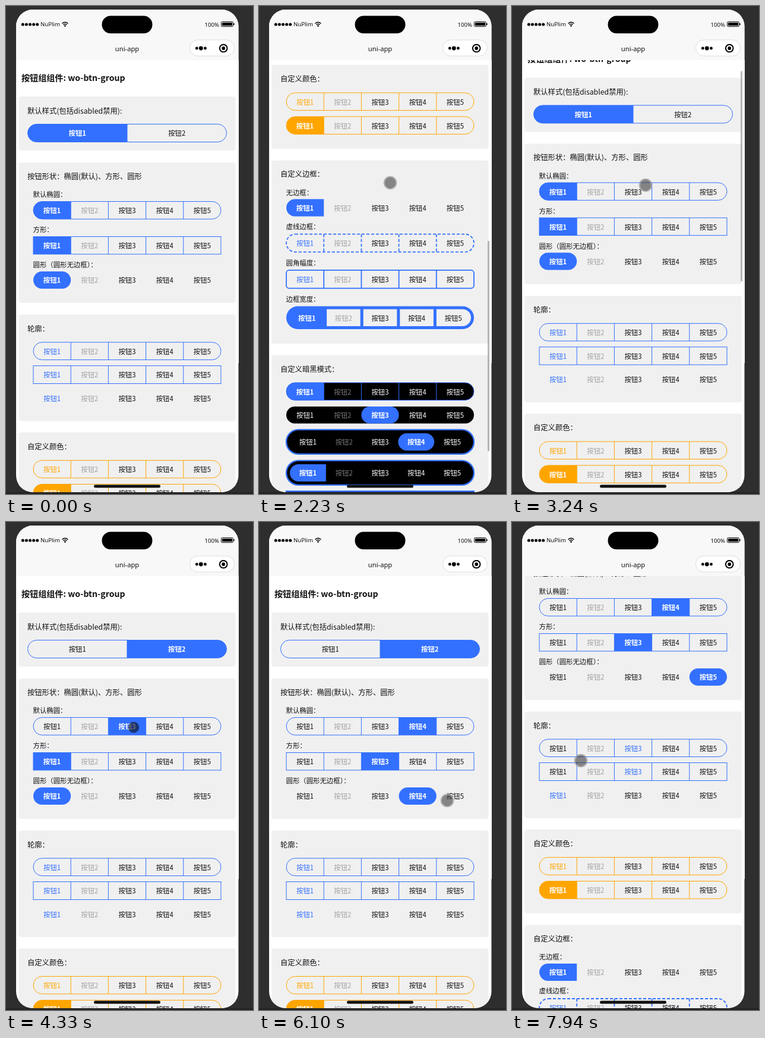
An HTML page that plays this animation: 416x820 px, repeating every 8 s.

```html
<!DOCTYPE html>
<html lang="zh-CN">
<head>
<meta charset="utf-8">
<title>wo-btn-group</title>
<style>
  html, body { margin: 0; width: 100%; height: 100%; overflow: hidden; background: #2e2e2e; }
  svg { display: block; width: 416px; height: 820px; }
  text { font-family: "Noto Sans CJK SC", "Noto Sans CJK", "Noto Sans", sans-serif; fill: #111; }
  .bar text { font-family: "Noto Sans", "Open Sans", sans-serif; }
</style>
</head>
<body>
<svg viewBox="0 0 416 820">
  <defs>
    <clipPath id="screen"><rect x="17" y="6" width="374.5" height="811" rx="28"/></clipPath>
  </defs>
  <rect width="416" height="820" fill="#2e2e2e"/>
  <rect y="817" width="416" height="3" fill="#242424"/>
  <rect x="391" y="91" width="1" height="509" fill="#fff"/>
  <g clip-path="url(#screen)">
    <rect x="17" y="6" width="375" height="811" fill="#fff"/>
    <g id="page"></g>
    <rect id="thumb" x="385" width="3" height="353" fill="#000" fill-opacity=".27"/>
    <g class="bar">
      <rect x="17" y="6" width="375" height="85" fill="#f8f8f8"/>
      <g id="dots"></g>
      <text x="58" y="34.3" font-size="9.6" textLength="">NuPlim</text>
      <g fill="none" stroke="#000" stroke-width="1.4">
        <path d="M94.5 29.5Q99.5 25 104.5 29.5M96.4 31.6Q99.5 28.8 102.6 31.6"/>
        <circle cx="99.5" cy="33.4" r=".6" fill="#000"/>
      </g>
      <rect x="161.5" y="16.5" width="85" height="29.5" rx="14.7"/>
      <text x="359" y="34.5" font-size="9.6" text-anchor="end">100%</text>
      <rect x="362.5" y="26.5" width="20" height="8" rx="1.8" fill="none" stroke="#000"/>
      <rect x="364" y="28" width="17" height="5" rx=".6"/>
      <rect x="383.3" y="29" width="1.5" height="3" rx=".7"/>
      <text x="204" y="76" font-size="11.2" text-anchor="middle">uni-app</text>
      <rect x="309.5" y="57" width="75" height="27" rx="13.5" fill="#fff" stroke="#dcdcdc"/>
      <circle cx="321.3" cy="71" r="2.4"/>
      <circle cx="328.3" cy="71" r="3.4"/>
      <circle cx="335.5" cy="71" r="2.4"/>
      <circle cx="366.2" cy="71" r="6.3" fill="none" stroke="#000" stroke-width="2"/>
      <circle cx="366.2" cy="71" r="2.9"/>
    </g>
    <rect x="148" y="804.5" width="112" height="5" rx="2.5" fill="#111"/>
  </g>
  <g id="pointer">
    <circle id="ring" r="10.2" fill="none" stroke="#999" stroke-opacity=".75" stroke-width="2.2"/>
    <circle id="disc" r="9.2"/>
  </g>
</svg>
<script>
const BLUE = '#3370ff', ORANGE = '#ffa500', LOOP = 8000;
const $ = id => document.getElementById(id);
const page = $('page');

function add(tag, attrs, parent = page) {
  const el = document.createElementNS('http://www.w3.org/2000/svg', tag);
  for (const k in attrs) el.setAttribute(k, attrs[k]);
  parent.appendChild(el);
  return el;
}

// cy is the optical centre of the line
function label(str, x, cy, size, extra = {}) {
  const el = add('text', { x, y: cy + size * 0.38, 'font-size': size, ...extra });
  el.textContent = str;
  return el;
}

function card(title, y, bottom, titleY) {
  add('rect', { x: 21.5, y, width: 365, height: bottom - y, rx: 4, fill: '#f0f0f0' });
  label(title, 36, titleY, 12.3);
}

function cellPath(x, y, w, h, rl, rr) {
  return `M${x + rl} ${y}H${x + w - rr}a${rr} ${rr} 0 0 1 ${rr} ${rr}V${y + h - rr}` +
    `a${rr} ${rr} 0 0 1 ${-rr} ${rr}H${x + rl}a${rl} ${rl} 0 0 1 ${-rl} ${-rl}V${y + rl}a${rl} ${rl} 0 0 1 ${rl} ${-rl}z`;
}

// A button group; returns a function that selects one button
function group(y, h, opts = {}) {
  const { x = 46, w = 316, n = 5, r = h / 2, sel = 1, fill = true, color = BLUE, border = 1,
    dash = 'none', dark = false, pill = false, inset = 0, lines = !pill } = opts;
  const cw = (w - 2 * inset) / n, ch = h - 2 * inset, left = x + inset;
  const ink = dark ? '#fff' : '#111';
  const off = dark ? '#777' : '#a3a3a3';
  if (dark) add('rect', { x, y, width: w, height: h, rx: r, fill: '#000' });

  const cells = [];
  for (let i = 0; i < n; i++) {
    const inner = Math.min(ch / 2, Math.max(0, r - inset));
    const rl = pill ? ch / 2 : i === 0 ? inner : 0;
    const rr = pill ? ch / 2 : i === n - 1 ? inner : 0;
    cells.push({ bg: add('path', { d: cellPath(left + i * cw, y + inset, cw, ch, rl, rr), fill: color }) });
  }
  if (border) {
    const line = { stroke: color, 'stroke-width': border, 'stroke-dasharray': dash };
    add('rect', { x, y, width: w, height: h, rx: r, fill: 'none', ...line });
    for (let i = 1; lines && i < n; i++) {
      const lx = left + i * cw;
      add('line', { x1: lx, x2: lx, y1: y, y2: y + h, ...line });
    }
  }
  cells.forEach((c, i) => {
    c.text = label('按钮' + (i + 1), left + (i + 0.5) * cw, y + h / 2 + 0.6, 11.4, { 'text-anchor': 'middle' });
  });

  let current = 0;
  const select = k => {
    if (k === current) return;
    current = k;
    cells.forEach((c, i) => {
      const on = i + 1 === k, disabled = n > 2 && i === 1;
      c.bg.style.display = on && fill ? '' : 'none';
      c.text.style.fill = on ? (fill ? '#fff' : color) : disabled ? off : ink;
      c.text.style.fontWeight = on && fill ? 700 : dark && !disabled ? 500 : 400;
    });
  };
  select(sel);
  return select;
}

const sub = (str, y) => label(str, 45.5, y, 11.4);

label('按钮组组件: wo-btn-group', 26, 120.5, 14.1, { 'font-weight': 700 });

card('默认样式(包括disabled禁用):', 152, 243, 176);
const basic = group(198.5, 30, { x: 36.5, w: 335, n: 2 });

card('按钮形状：椭圆(默认)、方形、圆形', 263, 499, 286);
sub('默认椭圆：', 317);
const oval = group(328.5, 29.5);
sub('方形：', 376);
const square = group(387.5, 29.5, { r: 0 });
sub('圆形（圆形无边框）：', 435);
const round = group(446, 29, { pill: true, border: 0 });

card('轮廓：', 518.5, 697.5, 542);
const outline = group(565, 29.5, { fill: false });
const outlineSq = group(604.5, 30, { fill: false, r: 0 });
group(644.5, 29, { fill: false, border: 0 });

card('自定义颜色：', 716.5, 857.5, 740);
group(763.5, 29.5, { fill: false, color: ORANGE });
group(803.5, 29.5, { color: ORANGE });

card('自定义边框：', 877, 1185, 900);
sub('无边框：', 931);
group(942, 29, { border: 0 });
sub('虚线边框：', 988);
group(1001, 30, { fill: false, border: 1.8, dash: '5 3' });
sub('圆角幅度：', 1049);
group(1061.5, 30.5, { fill: false, border: 1.8, r: 5 });
sub('边框宽度：', 1110);
group(1124.5, 33.5, { x: 48.5, w: 311, border: 5, inset: 1.5 });

card('自定义暗黑模式：', 1204, 1552, 1228);
group(1250.5, 29.5, { dark: true });
group(1290.5, 28.5, { dark: true, pill: true, border: 0, sel: 3 });
group(1329.5, 41, { dark: true, pill: true, border: 2.4, inset: 6, sel: 4 });
group(1381.5, 41, { dark: true, lines: false, border: 2.4, inset: 6 });
group(1433, 41, { dark: true, r: 0, lines: false, border: 2.4, inset: 6 });
group(1485, 41, { dark: true, r: 6, lines: false, border: 2.4, inset: 6 });

for (let i = 0; i < 5; i++) add('circle', { cx: 28.3 + i * 6.1, cy: 31, r: 2.5 }, $('dots'));

// time, x, y
const path = [
  [1270, 385, 330], [1690, 219, 293], [2030, 219, 293], [2230, 221, 297], [2980, 221, 297],
  [3240, 225, 301], [3330, 225, 301], [3580, 276, 222], [3800, 276, 222], [4200, 215, 345],
  [4640, 215, 345], [4800, 262, 343], [4920, 262, 343], [5180, 207, 402], [5300, 207, 402],
  [5420, 204, 466], [5600, 204, 466], [5830, 258, 462], [5930, 258, 462], [6100, 317, 468],
  [6450, 320, 469], [7050, 215, 378], [7230, 215, 378], [7500, 207, 414], [7640, 207, 414],
  [7870, 158, 415], [7940, 116, 401]
];
// time, offset
const scroll = [
  [1690, 0], [1760, 38], [2030, 550], [2140, 550], [2230, 617], [2470, 765],
  [2960, 765], [3240, 32], [3320, 0], [6450, 0], [6680, 200]
];
// time, group, button
const clicks = [
  [3620, basic, 2], [4270, oval, 3], [4840, oval, 4], [5230, square, 3], [5540, round, 3],
  [5870, round, 4], [6340, round, 5], [7170, outline, 3], [7560, outlineSq, 3]
];
const barTimes = [[1690, 2840], [2960, 3600], [6450, 7020]];

function at(keys, t, smooth) {
  if (t <= keys[0][0]) return keys[0].slice(1);
  const j = keys.findIndex(k => k[0] > t);
  if (j < 0) return keys[keys.length - 1].slice(1);
  const a = keys[j - 1], b = keys[j];
  let p = (t - a[0]) / (b[0] - a[0]);
  if (smooth) p = p * p * (3 - 2 * p);
  return a.slice(1).map((v, i) => v + (b[i + 1] - v) * p);
}

function render(t) {
  const [top] = at(scroll, t);
  page.setAttribute('transform', `translate(0 ${-top})`);

  const span = barTimes.find(s => t >= s[0] && t < s[1]);
  $('thumb').setAttribute('y', 94 + top * 0.487);
  $('thumb').style.opacity = span ? Math.min(1, (span[1] - t) / 150) : 0;

  const picked = new Map([basic, oval, square, round, outline, outlineSq].map(g => [g, 1]));
  for (const [time, g, k] of clicks) if (t >= time) picked.set(g, k);
  picked.forEach((k, g) => g(k));

  const [x, y] = at(path, t, true);
  const pressed = clicks.some(c => t > c[0] - 50 && t < c[0] + 90);
  $('pointer').setAttribute('transform', `translate(${x} ${y})`);
  $('pointer').style.display = t < 1270 ? 'none' : '';
  $('ring').style.display = pressed ? 'none' : '';
  $('disc').style.fill = pressed ? 'rgba(10,10,20,.6)' : 'rgba(60,60,60,.6)';
}

const start = performance.now();
function tick() {
  render((performance.now() - start) % LOOP);
  requestAnimationFrame(tick);
}
render(0);
requestAnimationFrame(tick);
</script>
</body>
</html>
```
